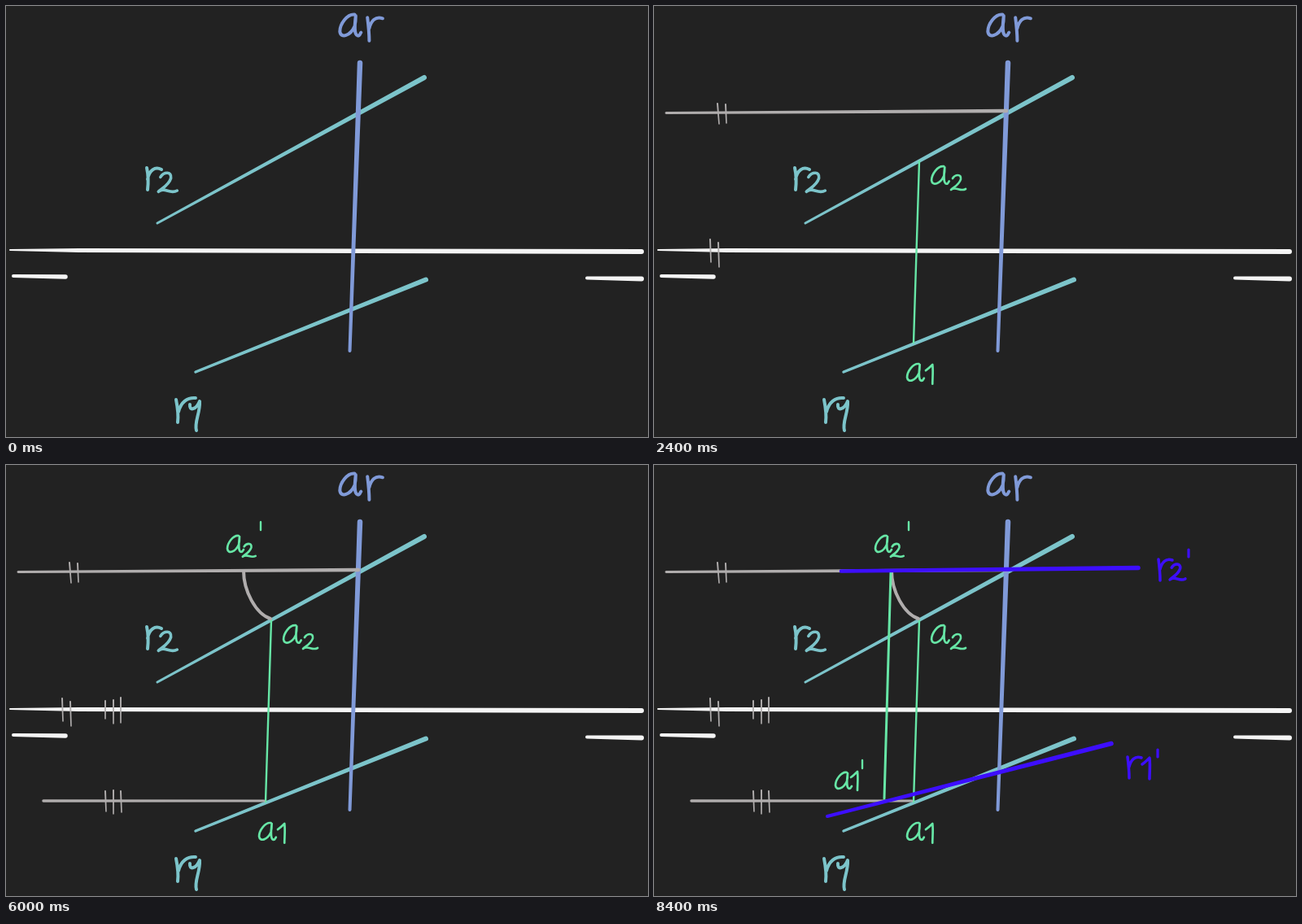
Animation, 789 px wide and 530 px high, one loop 9.6 s. Source, as an HTML page with a canvas:

```html
<!DOCTYPE html>
<html lang="en">
<head>
<meta charset="utf-8">
<title>Rotating a line about an axis</title>
<style>
  html, body { margin: 0; width: 100%; height: 100%; overflow: hidden; background: #222; }
  canvas { display: block; }
</style>
</head>
<body>
<canvas id="stage" width="789" height="530"></canvas>
<script>
const ctx = document.getElementById('stage').getContext('2d');
const STEP = 1200, STEPS = 8;
const WHITE = '#f4f4f4', TEAL = '#7cc4ca', AXIS = '#809ad8',
      GREEN = '#67e6a6', GRAY = '#b0adad', BLUE = '#3d0eff';

// Handwritten letters, in pixels at scale 1
const glyphs = {
  a: 'M15 2C8 1 1 11 1 18C2 25 11 22 15 13C16 9 16 5 16 3C15 12 14 21 18 22C20 22 20 20 21 19',
  r: 'M2 2C3 10 4 20 4 28M4 14C6 6 11 0 19 3',
  1: 'M0 8C3 6 6 3 8 1C9 9 8 17 8 24',
  2: 'M3 5C6 0 14 -1 13 6C11 13 4 16 1 19C7 14 12 22 19 18',
  "'": 'M0 0L0 10'
};

function curve(color, width, d, x = 0, y = 0, scale = 1) {
  ctx.save();
  ctx.translate(x, y);
  ctx.scale(scale, scale);
  ctx.strokeStyle = color;
  ctx.lineWidth = width / scale;
  ctx.lineCap = ctx.lineJoin = 'round';
  ctx.stroke(new Path2D(d));
  ctx.restore();
}

function glyph(color, width, name, x, y, scale) {
  curve(color, width, glyphs[name], x, y, scale);
}

// Pen stroke whose width changes from w1 to w2
function pen(color, x1, y1, w1, x2, y2, w2) {
  const angle = Math.atan2(y2 - y1, x2 - x1), side = Math.PI / 2;
  ctx.fillStyle = color;
  ctx.beginPath();
  ctx.arc(x1, y1, w1 / 2, angle + side, angle - side);
  ctx.arc(x2, y2, w2 / 2, angle - side, angle + side);
  ctx.fill();
}

function ticks(...lines) {
  for (const [x1, y1, x2, y2] of lines) pen(GRAY, x1, y1, 2, x2, y2, 1.6);
}

const layers = [
  function givenLines() {
    pen(WHITE, 5, 300, 2, 90, 300.5, 5);
    pen(WHITE, 90, 300.5, 5, 781, 302, 6);
    pen(WHITE, 9, 332, 4, 73, 333, 5.5);
    pen(WHITE, 714, 334.5, 4, 781, 335.5, 6);
    pen(TEAL, 186, 267, 3, 514, 88, 6);
    pen(TEAL, 233, 450, 3.5, 516, 336.5, 6);
    pen(AXIS, 435, 70, 6.5, 422.5, 424, 4);
    glyph(AXIS, 4, 'a', 409, 8, 1.3);
    glyph(AXIS, 4, 'r', 442, 12, 1.1);
    curve(TEAL, 4, 'M173 199C175 208 175 217 174 226M174 213C176 202 183 197 191 201');
    glyph(TEAL, 3.6, 2, 186, 204, 1.28);
    curve(TEAL, 4, 'M209 484C211 494 212 504 211 512M212 499C215 487 223 481 233 482');
    curve(TEAL, 4, 'M226 490C225 499 234 496 238 486C239 500 231 512 234 522');
  },
  function pointA() {
    pen(GREEN, 326, 191, 2.4, 319, 414, 2.4);
    glyph(GREEN, 2.7, 'a', 340, 195, 1.08);
    glyph(GREEN, 2.7, 2, 364, 207, 1);
    glyph(GREEN, 2.7, 'a', 310, 438, 1.04);
    glyph(GREEN, 2.7, 1, 334, 440, 1.03);
  },
  function upperParallel() {
    pen(GRAY, 15, 131.5, 3, 433, 129, 4.6);
    ticks([78, 120, 80, 145], [88, 121, 89, 144],
          [69, 287, 70, 315], [79, 291, 80, 321]);
  },
  function rotationArc() {
    curve(GRAY, 4, 'M292 130C292 155 307 183 325 189');
  },
  function rotatedUpperLabel() {
    glyph(GREEN, 2.7, 'a', 271, 85, 1);
    glyph(GREEN, 2.7, 2, 290, 96, .88);
    glyph(GREEN, 2.4, "'", 313, 70, 1);
  },
  function lowerParallel() {
    pen(GRAY, 46, 413, 3.5, 317, 413, 3.2);
    ticks([122, 401, 123, 426], [132, 400, 132, 429], [141, 401, 142, 427],
          [122, 290, 122, 312], [132, 289, 132, 318], [141, 286, 141, 317]);
  },
  function rotatedPoint() {
    pen(GREEN, 291, 132, 3, 283, 410, 3);
    glyph(GREEN, 2.7, 'a', 222, 376, 1);
    glyph(GREEN, 2.7, 1, 242, 376, 1);
    glyph(GREEN, 2.4, "'", 256, 363, 1);
  },
  function rotatedLine() {
    pen(BLUE, 230, 130.5, 4.5, 595, 126.5, 5.5);
    pen(BLUE, 213, 432, 4, 562, 342.5, 5.5);
    glyph(BLUE, 3.5, 'r', 618, 114, 1);
    glyph(BLUE, 3.5, 2, 633, 121, 1.05);
    glyph(BLUE, 3.2, "'", 657, 104, .9);
    glyph(BLUE, 3.5, 'r', 580, 357, 1);
    glyph(BLUE, 3.5, 1, 600, 359, 1.12);
    glyph(BLUE, 3.2, "'", 619, 350, .9);
  }
];

function draw(now) {
  const step = Math.floor(now / STEP) % STEPS;
  ctx.fillStyle = '#222';
  ctx.fillRect(0, 0, 789, 530);
  layers.slice(0, step + 1).forEach(layer => layer());
  requestAnimationFrame(draw);
}
draw(0);
</script>
</body>
</html>
```
